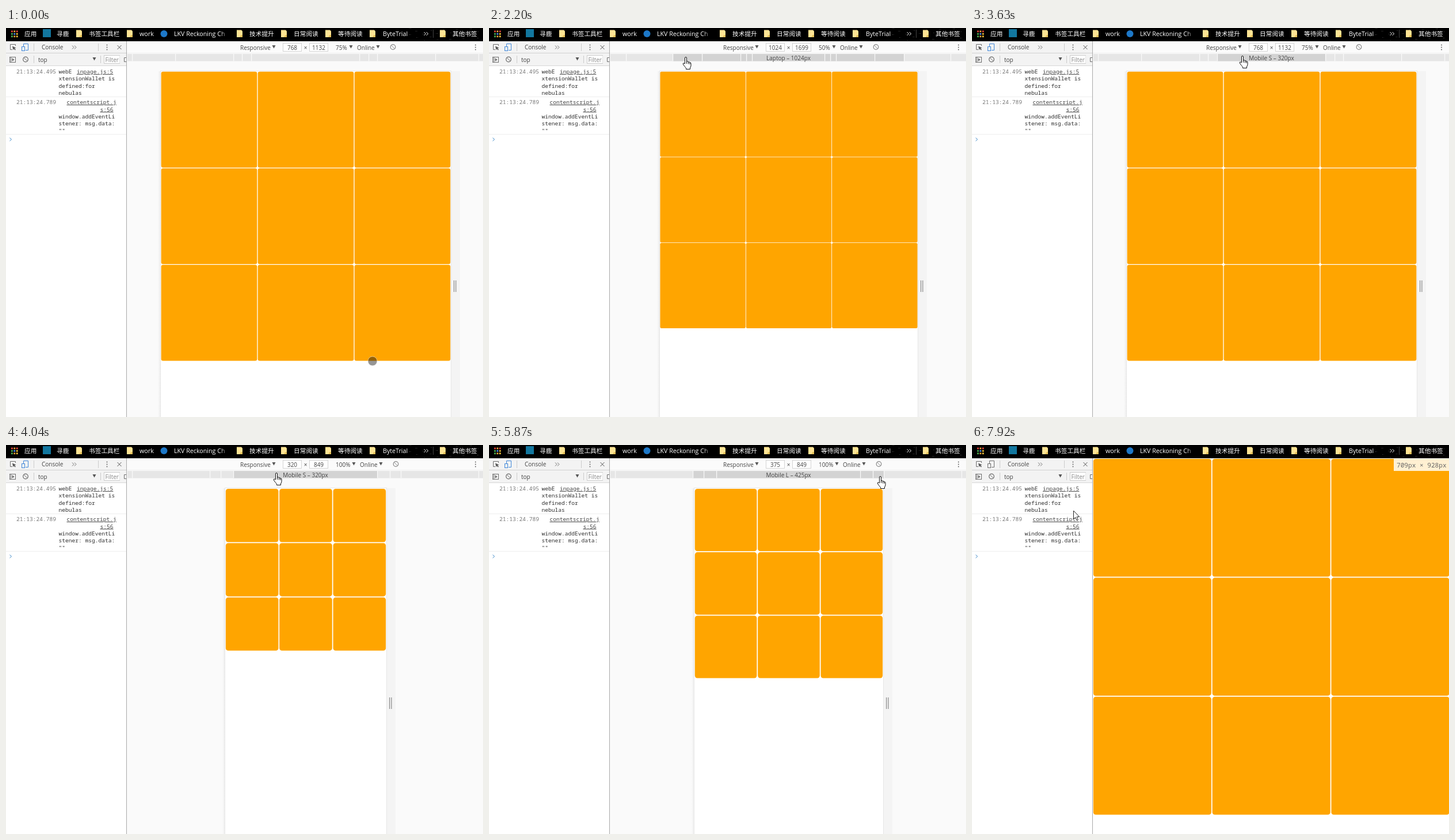
Animation of 829x675 px, one loop 8000 ms. Source, as an HTML page:

```html
<!DOCTYPE html>
<html lang="zh">
<head>
<meta charset="utf-8">
<title>Responsive grid</title>
<style>
html, body { margin: 0; height: 100%; overflow: hidden; background: #fafafa; }
svg { display: block; width: 100vw; height: 100vh; }
text { font: 10px "Open Sans", "Noto Sans CJK SC", sans-serif; fill: #444; }
.mark { font-size: 10.7px; font-weight: 500; fill: #fff; }
.mono { font: 9.6px "Noto Sans Mono", "DejaVu Sans Mono", monospace; fill: #303030; }
.time { fill: #777; }
.link { fill: #444; text-decoration: underline; }
.size { font-size: 11.1px; fill: #666; }
.mid { text-anchor: middle; }
.soft { fill: #888; }
</style>
</head>
<body>
<svg viewBox="0 0 829 675">
  <defs>
    <linearGradient id="fade"><stop offset="0" stop-color="#000" stop-opacity="0"/><stop offset="1"/></linearGradient>
    <linearGradient id="sheen"><stop offset="0" stop-color="#dedede" stop-opacity="0"/><stop offset="1" stop-color="#dedede"/></linearGradient>
    <clipPath id="stale"><rect x="297" y="75" width="448" height="600"/></clipPath>
  </defs>
  <g id="stage"></g>
  <g id="chrome"></g>
  <g id="overlay"></g>
</svg>
<script>
const LOOP = 8000, CENTER = 521, PAGE_TOP = 75, SCREEN_SCALE = .875;
const presets = { 2560: '4K', 1440: 'Laptop L', 1024: 'Laptop', 768: 'Tablet', 425: 'Mobile L', 375: 'Mobile M', 320: 'Mobile S' };
const devices = { 768: [1132, .75], 1024: [1699, .5], 320: [849, 1], 375: [849, 1], 425: [849, 1] };

// time, device width (0 = docked page), pointer, x, y, hovered preset or state
const poses = [
  [0, 768, 'touch', 637, 578], [200, 768, 'touch', 600, 470], [400, 768, 'touch', 480, 250],
  [610, 768, 'hand', 250, 52, 1024], [810, 768, 'hand', 226, 52, 1024], [1020, 1024, 'hand', 226, 52, 1024],
  [1390, 1024, 'hand', 232, 52, 2560], [1600, 1024, 'hand', 262, 52, 1440], [1800, 1024, 'hand', 300, 52, 1440],
  [2000, 1024, 'hand', 335, 51, 1024], [2200, 1024, 'hand', 342, 51, 1024], [2400, 1024, 'hand', 385, 51, 768],
  [2620, 1024, 'hand', 400, 50, 768], [2820, 1024, 'hand', 404, 50, 768], [3020, 768, 'hand', 404, 50, 768, 'stale'],
  [3230, 768, 'hand', 404, 50, 768], [3420, 768, 'hand', 435, 50, 320], [3630, 768, 'hand', 470, 49, 320],
  [4040, 320, 'hand', 470, 49, 320], [4460, 320, 'hand', 540, 50, 320], [4660, 320, 'hand', 630, 51, 320],
  [4860, 320, 'hand', 656, 52, 375], [5060, 375, 'hand', 656, 52, 375], [5450, 375, 'hand', 665, 53, 375],
  [5660, 375, 'hand', 677, 54, 425], [5870, 375, 'hand', 680, 55, 425], [6080, 425, 'hand', 680, 55, 425],
  [6270, 425, 'hand', 652, 58, 375], [6470, 425, 'touch', 600, 110], [6680, 425, 'touch', 380, 185],
  [6880, 425, 'arrow', 130, 120], [7080, 425, 'arrow', 43, 33.5], [7480, 425, 'arrow', 43, 33.5, 0, 'tip'],
  [7680, 0, 'arrow', 43, 33.5], [7920, 0, 'arrow', 176.5, 114]
];

const rect = (x, y, w, h, fill, more = '') => `<rect x="${x}" y="${y}" width="${w}" height="${h}" fill="${fill}" ${more}/>`;
const frame = (x, y, w, h, stroke, fill = 'none', more = '') => rect(x + .5, y + .5, w, h, fill, `stroke="${stroke}" ${more}`);
const text = (x, y, s, cls = '') => `<text x="${x}" y="${y}" class="${cls}">${s}</text>`;
const path = (d, stroke = '#6e6e6e', fill = 'none') => `<path d="${d}" stroke="${stroke}" fill="${fill}"/>`;
const circle = (x, y, r, fill, more = '') => `<circle cx="${x}" cy="${y}" r="${r}" fill="${fill}" ${more}/>`;
const triangle = (x, y) => path(`M${x} ${y}h6l-3 5.5z`, 'none', '#555');
const dots = (x, y) => [-4, 0, 4].map(d => circle(x, y + d, 1, '#666')).join('');
const ban = (x, y, color) => circle(x, y, 4.3, 'none', `stroke="${color}" stroke-width="1.2"`) + path(`M${x - 3} ${y - 3}l6 6`, color);

// Cells are a third of the viewport wide and 33vw tall, with a 1px margin.
function grid(x, y, viewport, scale) {
  const w = viewport / 3 * scale, h = (viewport * .33 + 2) * scale;
  let out = '';
  for (let i = 0; i < 9; i++)
    out += rect(x + i % 3 * w + scale, y + Math.floor(i / 3) * h + scale, w - 2 * scale, h - 2 * scale, '#ffa500', `rx="${5 * scale}"`);
  return out;
}

function ruler(zoom, hover) {
  const half = width => width * .7835 * zoom / 2, mid = CENTER - .5;
  let out = rect(211, 45, 618, 12.5, '#e6e6e6');
  if (hover) {
    const left = Math.max(211, mid - half(hover));
    out += rect(left, 45, 2 * (mid - left), 12.5, '#d3d3d3');
  }
  for (const width in presets)
    for (const side of [-1, 1]) {
      const x = Math.round(mid + side * half(width) - .5);
      if (x > 211 && x < 829) out += rect(x, 45, 1.2, 12.5, '#fafafa');
    }
  return out + (hover ? text(mid, 56, `${presets[hover]} – ${hover}px`, 'mid') : '');
}

function deviceBar(width, height, zoom) {
  const shift = zoom === 1 ? 5 : 0;
  return rect(210, 23, 619, 20, '#fbfbfb') + rect(210, 43, 619, 1, '#f0f0f0') +
    text(407, 37.5, 'Responsive') + triangle(462.5, 30) +
    frame(481, 26, 32, 14, '#d4d4d4', '#fff') + text(497.5, 37.5, width, 'mid') +
    text(520.5, 37.5, '×', 'mid') +
    frame(527, 26, 32, 14, '#d4d4d4', '#fff') + text(543.5, 37.5, height, 'mid') +
    text(573, 37.5, zoom * 100 + '%') + triangle(596.5 + shift, 30) +
    text(610 + shift, 37.5, 'Online') + triangle(643.5 + shift, 30) +
    ban(672.5 + shift, 33, '#888') + dots(816, 33.5);
}

function page(width, hover, state) {
  if (!width) return rect(210, 23, 619, 652, '#fff') + grid(210, 23, 709, SCREEN_SCALE) +
    rect(733, 24, 96, 21, '#fff0d2') + text(738, 39, '709px × 928px', 'mono size');
  const [height, zoom] = devices[width], scale = SCREEN_SCALE * zoom, w = width * scale, x = CENTER - w / 2;
  const cells = state === 'stale'
    ? `<g clip-path="url(#stale)">${grid(297, PAGE_TOP + .2, 1024, .575)}</g>`
    : grid(x, PAGE_TOP + .2, width, scale);
  return rect(210, 23, 619, 652, '#fafafa') + deviceBar(width, height, zoom) + ruler(zoom, hover) +
    rect(x - 5, PAGE_TOP, 5, 600, 'url(#sheen)', 'opacity=".5"') +
    rect(x - 1, PAGE_TOP - 1, w + 2, 601, '#e6e6e6') + rect(x, PAGE_TOP, w, 600, '#fff') +
    rect(x + w + 1, PAGE_TOP, 15, 600, '#f4f4f4') + cells +
    rect(x + w + 5, 438, 1.2, 20, '#888') + rect(x + w + 8.3, 438, 1.2, 20, '#888');
}

const pointers = {
  touch: circle(0, 0, 8, '#000', 'fill-opacity=".41" stroke="#fff" stroke-opacity=".5"'),
  hand: path('M-1.5 11V1a1.5 1.5 0 0 1 3 0V7Q4.2 6 4.4 8Q6.8 7.2 7 9Q9 8.6 9 10.5V14Q9 16 7.5 18V20.5H.5V18.5Q-2 16-4.6 12Q-5.5 9.5-3 10Z', '#111', '#fff') +
    path('M1.5 7v4M4.4 8v3.5M7 9v3', '#111'),
  arrow: path('M0 0V14.5L3.3 11.5 5.5 16.7 7.8 15.7 5.7 10.7H10.2Z', '#222', '#fff')
};

function bookmarks() {
  const folders = [122, 210, 401, 478, 555, 632, 754];
  const labels = [[32, '应用'], [88, '寻鹿'], [144, '书签工具栏'], [232, 'work'], [292, 'LKV Reckoning Ch'],
    [423, '技术提升'], [500, '日常阅读'], [577, '等待阅读'], [655, 'ByteTrial'], [776, '其他书签']];
  const dotColors = ['#e8453c', '#f2a33a', '#e8453c', '#4caf50', '#4c8bf5', '#f2c33a', '#4caf50', '#f2a33a', '#f2c33a'];
  let out = rect(0, 0, 829, 23, '#000');
  for (let i = 0; i < 45; i++)
    out += rect(700 + i * 47 % 129, i * 31 % 22, 1, 1, '#fff', `opacity="${.1 + i % 4 * .07}"`);
  dotColors.forEach((color, i) => out += rect(9 + i % 3 * 4.4, 4.5 + Math.floor(i / 3) * 4.4, 2.8, 2.8, color));
  out += rect(64, 2, 14, 14, '#12779f') + circle(274.5, 10, 6, '#1d78c8');
  for (const x of folders) out += path(`M${x} 3.5h8l2 2V16H${x}z`, 'none', '#ffe494') + path(`M${x + 7.5} 12h2.5v4H${x + 5}z`, 'none', '#e8c45c');
  for (const [x, s] of labels) out += text(x, 13.8, s, 'mark');
  return out + path('M726.5 7l3 3-3 3M730.5 7l3 3-3 3', '#fff') +
    rect(372, 0, 16, 23, 'url(#fade)') + rect(388, 0, 10, 23, '#000') + rect(742, 3, 1, 14, '#444');
}

function consolePanel() {
  const lines = [
    [18, 79, '21:13:24.495', 'time'], [91.5, 79, 'webE'], [123, 79, 'inpage.js:5', 'link'],
    [91.5, 91, 'xtensionWallet is'], [91.5, 103.5, 'defined:for'], [91.5, 115.5, 'nebulas'],
    [18, 132, '21:13:24.789', 'time'], [105.5, 132, 'contentscript.j', 'link'], [163.5, 144.5, 's:56', 'link'],
    [91.5, 157, 'window.addEventLi'], [91.5, 169.3, 'stener: msg.data:'], [91.5, 181.5, '""']
  ];
  const divider = (x, y) => rect(x, y, 1, 13, '#ccc');
  return rect(0, 23, 209, 652, '#fff') + rect(0, 23, 209, 42, '#f3f3f3') +
    rect(0, 43, 209, 1, '#d0d0d0') + rect(0, 65, 209, 1, '#d8d8d8') +
    path('M16.5 31V28.5H7.5V37.5H11') + path('M11 31.5l6.5 3-2.6.8 2 2.2-1.2 1-2-2.2-1.2 2z', 'none', '#555') +
    divider(48, 27) + text(62, 37, 'Console') + path('M115 30.5l3 3-3 3M119 30.5l3 3-3 3') +
    divider(160, 27) + dots(175.5, 33.5) + path('M193.5 30l7 7m0-7l-7 7', '#555') +
    frame(6, 50, 10, 9, '#6e6e6e') + path('M8.5 50.5v9', '#6e6e6e') + path('M10.5 52v6l4-3z', 'none', '#6e6e6e') + ban(34, 54.5, '#666') +
    divider(48, 48) + text(56, 58.5, 'top') + triangle(150.5, 51) + divider(164, 48) +
    frame(170, 47, 27, 14, '#ccc', '#fff') + text(172.5, 58.5, 'Filter', 'soft') + rect(196, 48, 1.5, 13, '#fff') +
    path('M209 51.5h-3.5v7h3.5') +
    rect(0, 119, 209, 1, '#eee') + rect(0, 184, 209, 1, '#eee') +
    lines.map(([x, y, s, cls = '']) => text(x, y, s, 'mono ' + cls)).join('') +
    rect(90, 178.5, 20, 5, '#fff') + path('M6.5 190.5l3 2.8-3 2.8', '#3b87c8') + rect(209, 23, 1, 652, '#aaa');
}

function overlay(width, pointer, x, y, state) {
  const color = width ? '#3f86d9' : '#6e6e6e';
  const toggle = path('M30.5 32V27.5h8v11H34', color) + frame(27, 32, 5, 7, color, '#f3f3f3');
  const tip = state === 'tip' ? frame(21, 46, 186, 18, '#ccc', '#f4f4f4') +
    text(28, 59.5, 'Toggle device toolbar') + text(134, 59.5, 'Ctrl + Shift + M', 'soft') : '';
  return toggle + tip + `<g transform="translate(${x} ${y})">${pointers[pointer]}</g>`;
}

const layer = id => document.getElementById(id);
layer('chrome').innerHTML = bookmarks() + consolePanel();
let shown;

function draw(now) {
  const time = now % LOOP, pose = poses.findLast(p => p[0] <= time);
  if (pose !== shown) {
    shown = pose;
    const [, width, pointer, x, y, hover, state] = pose;
    layer('stage').innerHTML = page(width, hover, state);
    layer('overlay').innerHTML = overlay(width, pointer, x, y, state);
  }
}

const start = performance.now();
function tick() {
  draw(performance.now() - start);
  requestAnimationFrame(tick);
}
tick();
</script>
</body>
</html>
```
